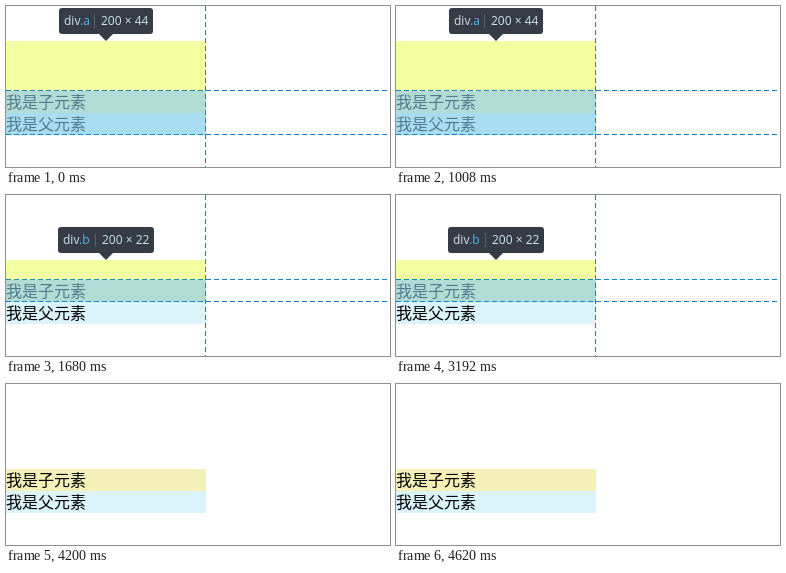
An HTML page with a canvas for the animation above (4.9 s loop, 384x161 px).

```html
<!DOCTYPE html>
<html lang="zh-CN">
<head>
<meta charset="utf-8">
<title>Margin inspection</title>
<style>
html, body { margin: 0; width: 100%; height: 100%; overflow: hidden; background: #fff; }
canvas { display: block; }
</style>
</head>
<body>
<canvas id="stage" width="384" height="161"></canvas>
<script>
const W = 384, H = 161, LOOP = 4900;
const BOX_W = 200, TOP = 85, ROW = 22;
const GUIDE = '#0088cc';
const ctx = document.getElementById('stage').getContext('2d');

const scenes = [
  { end: 1680, margin: 50, height: 44, name: '.a', size: '200 × 44', tip: { x: 53, w: 94, sep: 88 } },
  { end: 4200, margin: 20, height: 22, name: '.b', size: '200 × 22', tip: { x: 52, w: 96, sep: 89 } },
  { end: LOOP }
];

function rect(color, x, y, w, h) {
  ctx.fillStyle = color;
  ctx.fillRect(x, y, w, h);
}

function text(str, x, y, color, font) {
  ctx.font = font;
  ctx.fillStyle = color;
  ctx.fillText(str, x, y);
}

function page() {
  const font = '16px "Noto Sans CJK SC", "Noto Sans CJK", sans-serif';
  rect('#fff', 0, 0, W, H);
  rect('#f5f0b8', 0, TOP, BOX_W, ROW);
  rect('#dbf3fa', 0, TOP + ROW, BOX_W, ROW);
  text('我是子元素', 0, TOP + 17, '#000', font);
  text('我是父元素', 0, TOP + ROW + 17, '#000', font);
}

function guides(height) {
  for (const y of [TOP - 1, TOP + height - 1])
    for (let x = 0; x < W; x += 8) rect(GUIDE, x, y, 5, 1);
  for (let y = 0; y < H; y += 8) rect(GUIDE, BOX_W - 1, y, 1, 5);
}

function tooltip({ name, size, tip }, bottom) {
  const y = bottom - 33, base = y + 17;
  const font = '500 12px "Open Sans", "Noto Sans", sans-serif';
  ctx.fillStyle = '#353c45';
  ctx.beginPath();
  ctx.roundRect(tip.x, y, tip.w, 26, 3);
  ctx.fill();
  ctx.beginPath();
  ctx.moveTo(93, bottom - 7);
  ctx.lineTo(107, bottom - 7);
  ctx.lineTo(100, bottom);
  ctx.fill();
  text('div', tip.x + 5, base, '#d3e1f2', font);
  text(name, tip.x + 21, base, '#55b4ea', font);
  rect('#5a6169', tip.sep, y + 6, 1, 14);
  text(size, tip.sep + 7, base, '#cbe4ee', font);
}

// Translucent margin and content regions of the inspected element
function highlight(scene) {
  ctx.globalAlpha = 0.6;
  rect('#edff64', 0, TOP - scene.margin, BOX_W, scene.margin);
  rect('#87ceeb', 0, TOP, BOX_W, scene.height);
  ctx.globalAlpha = 1;
  guides(scene.height);
  tooltip(scene, TOP - scene.margin);
}

function draw(now) {
  const t = now % LOOP;
  const scene = scenes.find(s => t < s.end);
  page();
  if (scene.name) highlight(scene);
}

const start = performance.now();
function tick() {
  draw(performance.now() - start);
  requestAnimationFrame(tick);
}
tick();
</script>
</body>
</html>
```
